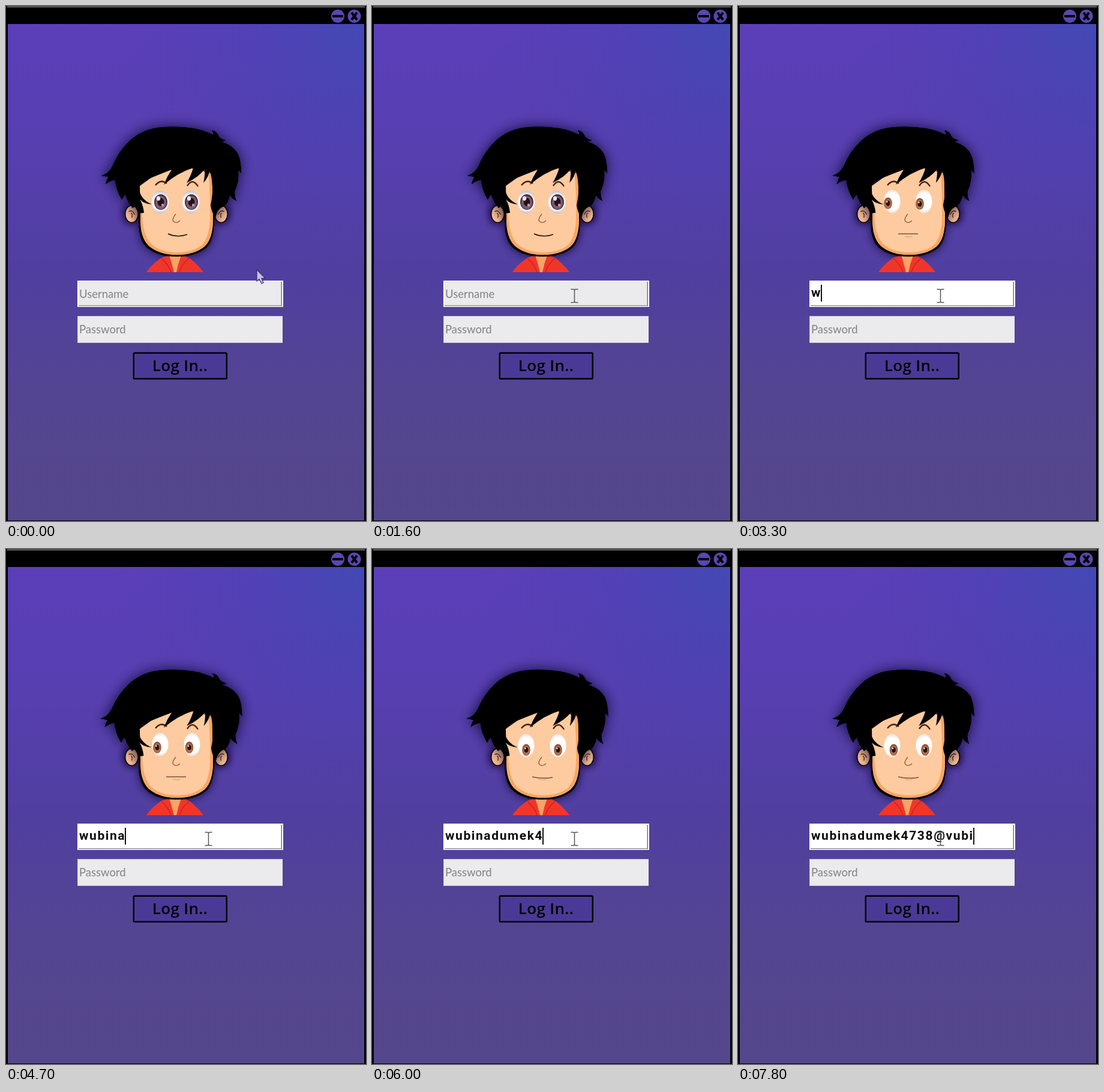
Write an HTML page with a canvas that moves like this. It is 600x859 px and loops after 8 s.

```html
<!DOCTYPE html>
<html lang="en">
<head>
<meta charset="utf-8">
<title>Login</title>
<style>
html, body { margin: 0; width: 100%; height: 100%; overflow: hidden; background: #000; }
canvas { display: block; width: 600px; height: 859px; }
</style>
</head>
<body>
<canvas id="stage" width="600" height="859"></canvas>
<script>
const ctx = document.getElementById('stage').getContext('2d');
const LOOP = 8000;
const FOCUS = 2100;   // the user clicks into the first field
const LOOK = 3300;    // the face starts following the text
const TYPED = 'wubinadumek4738@vubi';
const KEY_TIMES = [3300, 3800, 3900, 4200, 4600, 4700, 5000, 5100, 5300, 5500,
  5600, 6000, 6200, 6500, 6600, 7000, 7400, 7500, 7700, 7800];

// [time, x, y]
const POINTER = [[0, 418, 440], [1100, 364, 470], [1200, 350, 477], [1300, 340, 482], [1400, 337, 483]];
// [time, left pupil x, y, right pupil x, y, drop of the whites]
const GAZE = [[3300, 250, 329, 303, 330, 0], [4300, 252, 331, 305.5, 331, 0],
  [5100, 254.5, 333, 308, 333, 1], [6000, 257, 335, 310, 335, 2], [7400, 259.5, 335, 312, 335, 2]];

const shape = d => new Path2D(d);
const HAIR = shape(`M159 283 Q172 279 178 266 Q187 243 207 224 Q226 207 252 203 Q280 199 312 204
  Q330 207 345 215 Q346 211 343 207 Q352 209 355 218 Q360 223 366 224 Q361 227 357 226
  Q377 231 386 246 Q392 258 392 279 L387 273 Q389 293 381 309 Q381 319 384 325 Q376 321 373 315
  Q371 327 364 334 Q353 336 349 353 Q342 343 341 332 Q345 314 344 300 Q343 284 339 273
  Q339 284 329 295 Q332 282 331 272 Q322 285 301 295 Q308 284 312 270 Q288 277 263 298
  Q268 285 276 273 Q250 283 234 290 Q225 295 222 303 Q222 321 243 331 Q229 330 223 322
  Q229 333 230 345 L221 346 Q218 335 214 330 Q215 335 211 337 Q203 328 199 314
  Q196 317 193 323 Q183 306 182 290 Q174 291 166 297 Q168 289 171 285 Z`);
const FACE = shape(`M221 300 L221 352 Q220 390 235 403 Q253 418 284 418 Q316 418 334 403
  Q347 390 347 355 L345 280 L276 262 Z`);
const SKIN = shape(`M223 300 L224 352 Q223 386 238 400 Q256 415 284 415 Q314 415 331 401
  Q345 388 345 355 L343 275 L276 262 Z`);
const SHADE = shape(`M224 340 Q223 386 238 400 Q256 415 284 415 Q314 415 331 401 Q345 388 345 355
  L343 272 L337 272 Q341 315 340 355 Q339 386 326 399 Q311 411 283 411 Q257 410 242 397
  Q228 382 227 348 Z`);
const SHIRT = shape('M234 444 Q241 433 256 422 Q264 416 274 418 L290 418 Q300 416 308 422 Q322 434 329 444 Z');
const NECK = shape('M272 416 Q276 428 280 444 L284 444 Q287 429 292 416 Z');
const FOLDS = shape('M259 421 Q271 431 275 444 M305 421 Q293 430 289 444');
const ARROW = shape('M0 0 V19 L4 15.5 L8 23 L11 21.5 L8 14 H14 Z');
const IBEAM = shape('M-6 -11 H-2 Q0 -11 0 -9 Q0 -11 2 -11 H6 M0 -9 V9 M-6 11 H-2 Q0 11 0 9 Q0 11 2 11 H6');

const latest = (steps, t) => steps.filter(s => s[0] <= t).pop();

function fill(path, color) {
  ctx.fillStyle = color;
  ctx.fill(path);
}

function stroke(path, color, width) {
  ctx.strokeStyle = color;
  ctx.lineWidth = width;
  ctx.stroke(path);
}

function box(x, y, w, h, color) {
  ctx.fillStyle = color;
  ctx.fillRect(x, y, w, h);
}

function oval(x, y, rx, ry, color) {
  ctx.beginPath();
  ctx.ellipse(x, y, rx, ry, 0, 0, Math.PI * 2);
  ctx.fillStyle = color;
  ctx.fill();
}

function label(text, x, y, font, color, spacing = 0) {
  ctx.font = font;
  ctx.fillStyle = color;
  ctx.letterSpacing = spacing + 'px';
  ctx.fillText(text, x, y);
  const width = ctx.measureText(text).width;
  ctx.letterSpacing = '0px';
  return width;
}

function blend(gradient, colors) {
  colors.forEach((c, i) => gradient.addColorStop(i / (colors.length - 1), c));
  return gradient;
}

function castShadow(blur) {
  ctx.shadowColor = 'rgba(8,0,35,.85)';
  ctx.shadowBlur = blur;
}

function drawWindow() {
  box(0, 0, 600, 859, '#000');
  box(2, 1, 596, 1, '#b5b5b5');
  const base = ctx.createLinearGradient(0, 30, 0, 858);
  box(3, 30, 594, 828, blend(base, ['#5b3fba', '#573fb0', '#503f9f', '#544592', '#55478b']));
  const glow = ctx.createRadialGradient(597, 30, 0, 597, 30, 420);
  box(3, 30, 594, 828, blend(glow, ['rgba(64,74,180,.9)', 'rgba(68,68,178,.35)', 'rgba(80,64,170,0)']));

  oval(553, 17, 11, 11, '#5a46b2');
  box(544, 15, 18, 4, '#000');
  oval(580.5, 17, 11, 11, '#5a46b2');
  stroke(shape('M576 11 L585 23 M585 11 L576 23'), '#000', 4);
}

function drawEar(x, side) {
  oval(x, 347, 11.5, 15, '#000');
  oval(x, 347, 10, 13.5, '#fdc497');
  ctx.save();
  ctx.translate(x, 347);
  ctx.scale(side, 1);
  stroke(shape('M-5 -4 Q1 -8 5 1 M-1 -2 Q2 1 0 6'), '#4a2616', 1.3);
  ctx.restore();
}

function drawOpenEye(x) {
  const white = ctx.createRadialGradient(x + 1, 328, 7, x, 327, 19);
  oval(x, 327, 14.5, 19, blend(white, ['#fff', '#f5f6fa', '#b9bdcb']));
  oval(x + 1, 327, 11, 13, '#49303e');
  oval(x + 1, 328, 9, 11, '#835c6c');
  oval(x + 1, 327, 5.5, 7, '#20121c');
  oval(x - 3, 321, 3.2, 3.8, '#e9e4ee');
  oval(x + 4, 332, 2.2, 2.6, '#b49aa8');
}

function drawLookingEye(x, y, px, py) {
  const white = ctx.createRadialGradient(x, y, 6, x, y, 20);
  oval(x, y, 13.5, 19.5, blend(white, ['#fff', '#fff', '#eadfda']));
  oval(px, py, 6.8, 9.8, '#8d5138');
  oval(px, py + 1, 5.4, 8, '#b96e4b');
  oval(px, py, 3.4, 4.6, '#2a130d');
  oval(px - 1.6, py - 2.5, 1.3, 1.6, '#e8d5cb');
}

function drawFace(t) {
  const looking = t >= LOOK;
  ctx.save();
  ctx.beginPath();
  ctx.rect(130, 170, 290, 274);
  ctx.clip();

  castShadow(16);
  drawEar(209.5, 1);
  drawEar(358.5, -1);
  fill(FACE, '#000');
  castShadow(0);
  ctx.shadowColor = 'transparent';
  fill(SHIRT, '#f0362a');
  fill(NECK, '#fba269');
  stroke(FOLDS, '#c4221d', 1.4);
  fill(FACE, '#000');
  fill(SKIN, '#fdcb9f');
  fill(SHADE, '#f9a662');

  if (looking) {
    const [, lx, ly, rx, ry, drop] = latest(GAZE, t);
    drawLookingEye(257, 326 + drop, lx, ly);
    drawLookingEye(310, 326 + drop, rx, ry);
  } else {
    drawOpenEye(257);
    drawOpenEye(308);
  }

  stroke(shape('M249 299 Q258 288 268 296 M302 300 Q311 286 320 301'), '#4a2415', 2.4);
  stroke(shape('M283 347 Q275 357 280 360 Q285 363 290 358'), '#8a5a40', 1.3);
  if (looking) {
    stroke(shape(t < 6000 ? 'M267 380 L300 380' : 'M267 380 Q284 384 301 381'), '#7d503f', 1.4);
    stroke(shape('M278 384 Q285 386 291 384'), '#d29a76', 1.2);
  } else {
    stroke(shape('M270 380 Q286 387 302 381'), '#2a120a', 1.5);
  }

  if (looking) {
    ctx.translate(276, 0);
    ctx.scale(1.013, 1);
    ctx.translate(-276, 0);
  }
  // The hair darkens the backdrop, not the face below the fringe.
  ctx.save();
  const outside = new Path2D();
  outside.rect(0, 0, 600, 859);
  outside.addPath(FACE);
  ctx.clip(outside, 'evenodd');
  castShadow(22);
  fill(HAIR, '#000');
  ctx.restore();
  fill(HAIR, '#000');
  ctx.restore();
}

function drawUserField(t) {
  const active = t >= FOCUS;
  box(119, 458, 343, 44, '#fff');
  box(121, 459, 338, 40, active ? '#fff' : '#ebeaec');
  box(458.5, 460, 1.5, 41, '#77747c');
  box(121, 499, 339, 1.5, '#96939c');

  if (!active) {
    label('Username', 122, 487, '18.5px Lato, sans-serif', '#828184');
    return;
  }
  const count = KEY_TIMES.filter(k => k <= t).length;
  const width = label(TYPED.slice(0, count), 122, 485, 'bold 21px Roboto, sans-serif', '#0c0c0c', 1.6);
  const blinkOff = t >= 2600 && t < 3100;
  if (!blinkOff) {
    const x = count ? Math.round(122 + width - 1) : 122;
    box(x, 465, count ? 2 : 1, 28, t < 2200 ? '#555' : '#111');
  }
}

function drawForm(t) {
  drawUserField(t);
  box(119, 517, 342, 45, '#c9c8df');
  box(120, 518, 341, 43, '#ebeaec');
  label('Password', 122, 546, '18.5px Lato, sans-serif', '#828184');

  const button = new Path2D();
  button.roundRect(212.75, 578.75, 155, 43, 1.5);
  fill(button, '#4a3a96');
  stroke(button, '#000', 2.5);
  ctx.textAlign = 'center';
  label('Log In..', 290, 609, '600 26px "Open Sans", sans-serif', '#000', .3);
  ctx.textAlign = 'left';
}

function drawPointer(t) {
  const [start, x, y] = latest(POINTER, t);
  ctx.save();
  if (start === 0) {
    ctx.translate(x, y);
    fill(ARROW, '#c8bfe8');
    stroke(ARROW, '#3d3069', 1.2);
  } else {
    ctx.translate(x + .5, y + .5);
    stroke(IBEAM, '#55545a', 1.5);
  }
  ctx.restore();
}

function frame(now) {
  const t = now % LOOP;
  drawWindow();
  drawFace(t);
  drawForm(t);
  drawPointer(t);
  requestAnimationFrame(frame);
}
requestAnimationFrame(frame);
</script>
</body>
</html>
```
